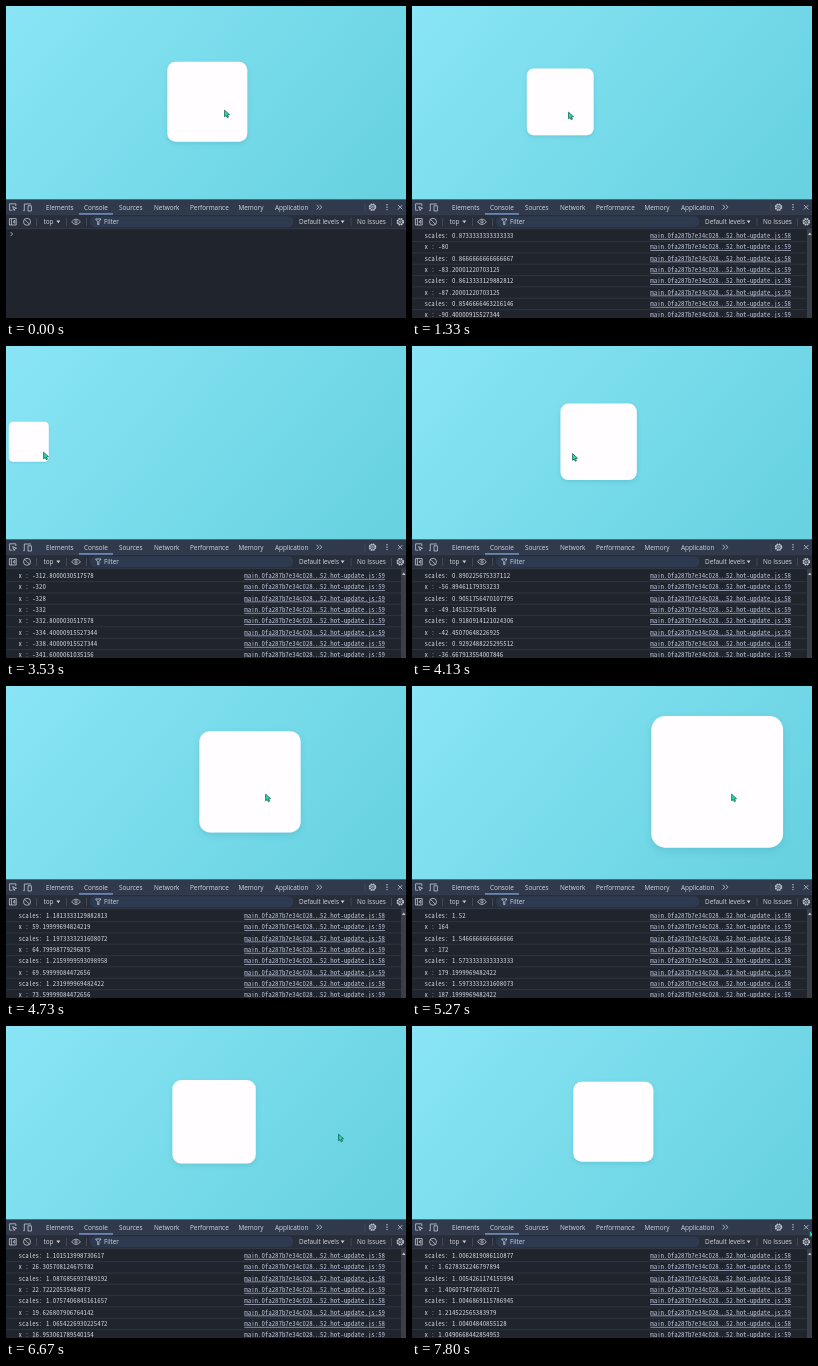
Write an HTML page that moves like this. It is 400 by 312 pixels and loops after 8000 ms.

```html
<!DOCTYPE html>
<html lang="en">
<head>
<meta charset="utf-8">
<title>Draggable card with console</title>
<style>
  html, body { margin: 0; width: 100%; height: 100%; overflow: hidden; background: #20242d; }
  svg { display: block; width: 100vw; height: 100vh; }
  .ui { font: 6.4px "Open Sans", "Noto Sans", sans-serif; fill: #d3d7e0; }
  .log {
    font: 6.84px "Noto Sans Mono CJK KR", "Noto Sans Mono CJK JP", "Liberation Mono", monospace;
    font-size-adjust: ch-width .5;
    fill: #cdd1d9;
    white-space: pre;
  }
  .link { text-anchor: end; text-decoration: underline; text-decoration-thickness: .6px; fill: #b9c2d6; }
  .icon { fill: none; stroke: #c3c8d3; stroke-width: .8; }
  .solid { fill: #c3c8d3; }
  .sep { stroke: #525a6b; stroke-width: .6; }
</style>
</head>
<body>
<svg viewBox="0 0 400 312" preserveAspectRatio="none">
  <defs>
    <linearGradient id="sky" gradientUnits="userSpaceOnUse" x1="40" y1="-40" x2="340" y2="220">
      <stop offset="0" stop-color="#89e5f5"/>
      <stop offset="1" stop-color="#68d2e1"/>
    </linearGradient>
    <filter id="shadow" x="-30%" y="-30%" width="160%" height="160%">
      <feDropShadow dx="0" dy="2" stdDeviation="2.5" flood-color="#155a68" flood-opacity=".15"/>
    </filter>
    <clipPath id="page"><rect width="400" height="194"/></clipPath>
    <clipPath id="console"><rect y="223" width="400" height="89"/></clipPath>
    <g id="gear">
      <circle r="3.1" class="icon" stroke-dasharray="1.6 .85" style="stroke-width:1.3"/>
      <circle r="2.5" class="icon"/>
      <circle r=".9" class="icon"/>
    </g>
  </defs>

  <g clip-path="url(#page)">
    <rect width="400" height="194" fill="url(#sky)"/>
    <g id="card"><rect x="-40" y="-40" width="80" height="80" rx="8.4" fill="#fffdff" filter="url(#shadow)"/></g>
  </g>

  <rect y="193.6" width="400" height="118.4" fill="#20242d"/>
  <g id="rows" clip-path="url(#console)"></g>
  <g id="bar">
    <rect x="395" y="223" width="5" height="89" fill="#3a3e46"/>
    <path d="M396 229l1.8-2.6 1.8 2.6z" class="solid"/>
  </g>

  <rect y="193.6" width="400" height="14.9" fill="#313a4d"/>
  <rect y="208.5" width="400" height="14.3" fill="#282e3a"/>
  <path d="M0 208.5H400M0 222.7H400" stroke="#414959" stroke-width=".5"/>
  <rect x="73" y="207.4" width="34" height="1.1" fill="#8ab4f8"/>
  <rect x="84" y="210.2" width="203.5" height="11" rx="5.5" fill="#2e3a50"/>

  <g class="icon">
    <path d="M9.8 200v-2.2H3.6v6.4h2.6M6.6 200.6l4 1.6-1.8.6-.6 1.8z"/>
    <path d="M18.8 204.6h-1.6M18.3 204v-6h6.6M22 199.8h3.4v5.2H22z"/>
    <path d="M310.6 198.8l2.2 2.4-2.2 2.4M313.6 198.8l2.2 2.4-2.2 2.4"/>
    <path d="M392 199l4.4 4.4M396.4 199l-4.4 4.4"/>
    <path d="M3.4 212.6h6.8v6.4H3.4zM5.4 212.6v6.4M8.8 214.3v3l-1.9-1.5z"/>
    <circle cx="21" cy="215.8" r="3.5"/><path d="M18.6 213.4l4.8 4.8"/>
    <path d="M65.6 215.8q4.4-5.4 8.8 0q-4.4 5.4-8.8 0z"/><circle cx="70" cy="215.8" r="1.2"/>
    <path d="M89.6 213h5.4l-2.1 2.7v2.9h-1.2v-2.9z"/>
  </g>
  <g class="solid">
    <circle cx="381" cy="198.8" r=".7"/><circle cx="381" cy="201.2" r=".7"/><circle cx="381" cy="203.6" r=".7"/>
    <path d="M50.3 214.4h4l-2 2.8zM334.6 214.4h4l-2 2.8z"/>
  </g>
  <path class="sep" d="M30.5 212v8M60.5 212v8M80.5 212v8M345 212v8M385.5 212v8M359 197.5v8"/>
  <use href="#gear" x="366.5" y="201.2"/>
  <use href="#gear" x="394.3" y="215.8"/>
  <g class="ui" id="labels"></g>

  <path id="cursor" d="M.6 .2v6.6l1.6-1.3 1.1 2.3 1.2-.6-1.1-2.2 2.1-.3z" fill="#25dcae" stroke="#12554c" stroke-width=".75"/>
</svg>
<script>
const $ = id => document.getElementById(id);
const LOOP = 8000, ROWS = 8, ROW_H = 11.33, LAG = 0.066;

function add(parent, name, attrs, text = "") {
  const el = document.createElementNS("http://www.w3.org/2000/svg", name);
  for (const key in attrs) el.setAttribute(key, attrs[key]);
  el.textContent = text;
  return parent.appendChild(el);
}

[["Elements", 40], ["Console", 78], ["Sources", 113], ["Network", 148], ["Performance", 184],
 ["Memory", 232.5], ["Application", 269]].forEach(([s, x]) => add($("labels"), "text", { x, y: 203.6 }, s));
[["top", 37.5], ["Filter", 98], ["Default levels", 293], ["No Issues", 351]]
  .forEach(([s, x]) => add($("labels"), "text", { x, y: 218.1 }, s));

// Linear path through [time, ...values]
function along(keys, t, i = 1) {
  const n = keys.findIndex(k => k[0] > t);
  if (n === 0) return keys[0][i];
  if (n < 0) return keys[keys.length - 1][i];
  const a = keys[n - 1], b = keys[n];
  return a[i] + (b[i] - a[i]) * (t - a[0]) / (b[0] - a[0]);
}

const dragLeft = [[.49, 0], [.8, -32], [1.1333, -76], [1.2333, -87.2], [1.2667, -90.4], [1.3333, -99],
  [1.8, -180], [2.1, -234.4], [2.1667, -245.6], [2.2, -254.4], [2.2667, -269], [2.5667, -312.8],
  [2.6333, -328], [2.6667, -332], [2.7333, -334.4], [2.8, -341.6]];
const dragRight = [[4.333, -11], [4.5333, 54.4], [4.6333, 69.6], [4.6667, 73.6], [4.7333, 79.7],
  [5.2, 187], [5.4667, 214.4], [5.5, 220], [5.6, 224.8]];
const pointer = [[.49, 218, 104], [.8, 194, 105], [1.333, 156, 106], [2.267, 65, 106], [2.8, 37, 106],
  [3.6, 37, 106], [4.333, 206, 108], [4.733, 259, 108], [5.2, 316, 108], [5.55, 332, 108],
  [6.9, 332, 108], [7.73, 397, 204.5]];

const RELEASE_1 = 3.508, GRAB = 4.333, RELEASE_2 = 5.96098;

// Overdamped return to zero
function spring(t) {
  const a = 4.3935, b = 22;
  return (b * Math.exp(-a * t) - a * Math.exp(-b * t)) / (b - a);
}

const isFree = t => t > RELEASE_2 || (t > RELEASE_1 && t < GRAB);

function offset(t) {
  if (t > RELEASE_2) return 224.8 * spring(t - RELEASE_2);
  if (t >= GRAB) return along(dragRight, t);
  if (t > RELEASE_1) return -341.6 * spring(t - RELEASE_1);
  return along(dragLeft, t);
}

const scaleOf = x => Math.max(.5, 1 + x / (x > 0 ? 300 : 600));

// Console history, sampled at 30 Hz
const history = [];
{
  // Drag steps are 0.8 units, stored as 16-bit fractions
  const snap = x => Math.floor(Math.round(x / .8) * .8 * 65536) / 65536;
  let lastX = 0, lastScale = 1;
  for (let k = 0; k <= 240; k++) {
    const t = k / 30, raw = offset(t);
    if (t > 7 && raw < 1.04) break;
    const x = isFree(t) ? raw : snap(raw), scale = scaleOf(x);
    if (x === lastX) continue;
    history.push({ t, isX: true, text: "x : " + x });
    if (scale !== lastScale) history.push({ t, isX: false, text: "scales: " + scale });
    lastX = x;
    lastScale = scale;
  }
}

const lines = Array.from({ length: ROWS }, (_, i) => {
  const g = add($("rows"), "g", {}), y = 231.9 + i * ROW_H;
  add(g, "path", { d: `M0 ${y + 3.7}H395`, stroke: "#3a404c", "stroke-width": .6 });
  return {
    g,
    text: add(g, "text", { x: 12.5, y, class: "log" }),
    link: add(g, "text", { x: 379, y, class: "log link" })
  };
});
const prompt = add($("rows"), "path", { class: "icon" });

function draw(ms) {
  const t = Math.floor((ms + 3.4) * .015) / 15;
  const x = offset(t);
  $("card").setAttribute("transform", `translate(${201.3 + x * .536} 95.8) scale(${scaleOf(x)})`);
  $("cursor").setAttribute("transform", `translate(${along(pointer, t)} ${along(pointer, t, 2)})`);

  let end = history.filter(r => r.t <= t - LAG + .001).length;
  while (end && !history[end - 1].isX) end--;
  const shown = history.slice(Math.max(0, end - ROWS), end);
  lines.forEach((line, i) => {
    const row = shown[i];
    line.g.setAttribute("visibility", row ? "visible" : "hidden");
    if (!row) return;
    line.text.textContent = row.text;
    line.link.textContent = "main.0fa287b7e34c028…52.hot-update.js:" + (row.isX ? 59 : 58);
  });
  prompt.setAttribute("d", `M4.6 ${226 + shown.length * ROW_H}l2 2-2 2`);
  $("bar").setAttribute("visibility", end >= ROWS ? "visible" : "hidden");
}

const start = performance.now();
function tick() {
  draw((performance.now() - start) % LOOP);
  requestAnimationFrame(tick);
}
tick();
</script>
</body>
</html>
```
